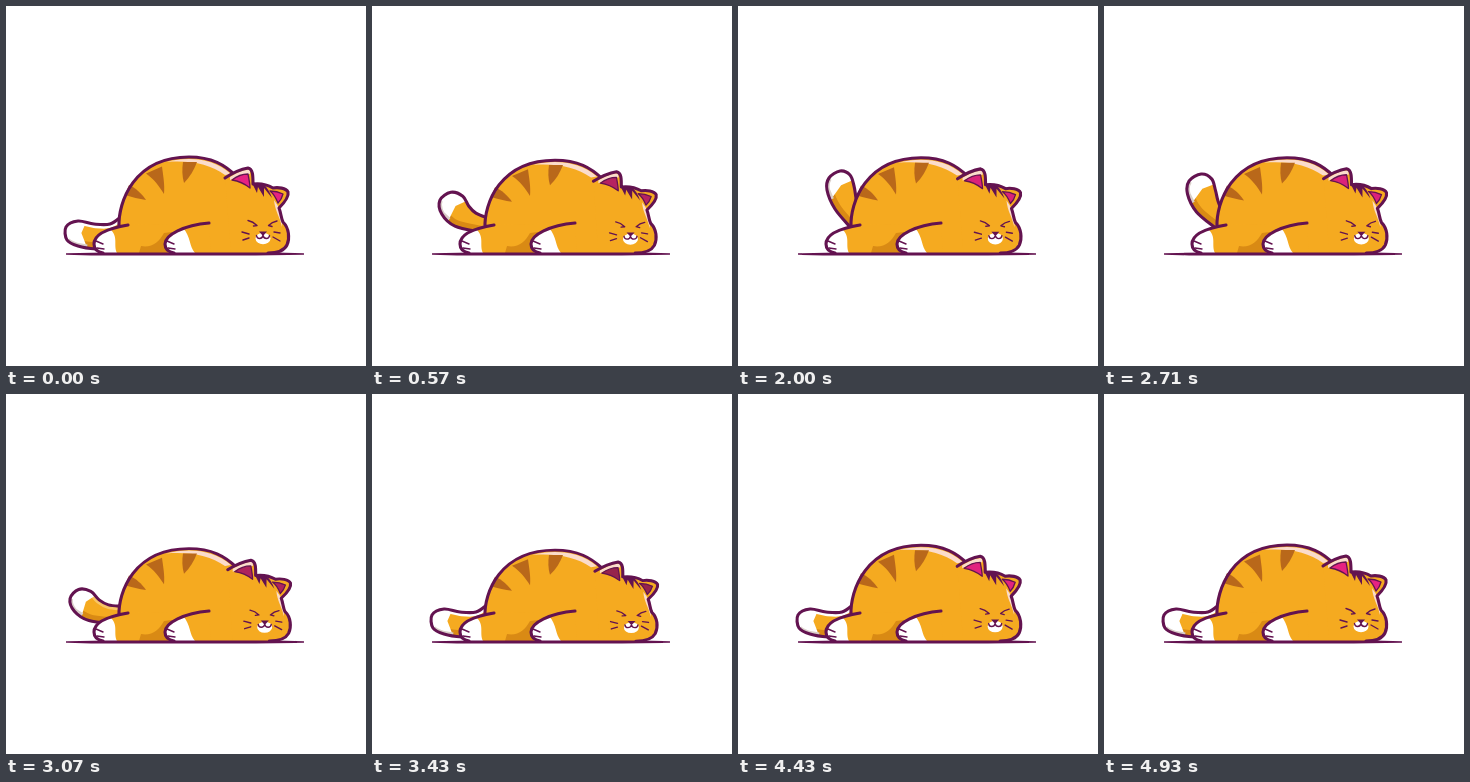
These frames come from a looping animation (360 px wide and 360 px high, 5000 ms). An HTML page:

```html
<!DOCTYPE html>
<html lang="en">
<head>
<meta charset="utf-8">
<title>Sleepy cat</title>
<style>
  html, body { margin: 0; width: 100%; height: 100%; overflow: hidden; background: #fff; }
  svg { display: block; width: 100vw; height: 100vh; }
  .line { fill: none; stroke: #631350; stroke-width: 3.1; stroke-linecap: round; stroke-linejoin: round; }
  .thin { stroke-width: 1.4; }
  .fur { fill: #f5aa20; }
  .shade { fill: #d98a14; }
  .stripe { fill: #b9681a; }
  .white { fill: #fff; }
  .glow { fill: #fbdccb; }
  .ink { fill: #631350; }
</style>
</head>
<body>
<svg viewBox="0 0 360 360">
  <defs><clipPath id="tailClip"><path id="tailMask"/></clipPath></defs>

  <g id="tail">
    <g clip-path="url(#tailClip)">
      <path id="tailFur" class="fur"/>
      <path id="tailShade" fill="none" stroke="#d98a14" stroke-width="13"/>
      <path id="tailGlow" fill="none" stroke="#fff" stroke-width="8"/>
      <path id="tailTip" class="white"/>
      <path id="tipShade" fill="none" stroke="#d9cfc9" stroke-width="6"/>
    </g>
    <path id="tailLine" class="line"/>
  </g>

  <g id="body">
    <path class="fur" d="M112 222C112 196 128 151 183 151C206 151 219 159 230 170L262 200L270 247H108Z"/>
    <path class="glow" d="M160 156C182 150 208 152 225 168L219 169C204 158 184 154 160 156Z"/>
    <g class="stripe">
      <path d="M123 179C130 182 136 188 140 194C133 193 126 191 119 189Z"/>
      <path d="M140 167.500L156 160.500C157 169 159 179 158 188C153 180 148 173 140 167.500Z"/>
      <path d="M177 156H191C188 164 184 171 178 177C176 170 176 163 177 156Z"/>
    </g>
    <path class="line" d="M113 221C112 196 128 151 183 151C206 151 219 159 230 170"/>
  </g>

  <g id="legs">
    <path class="fur" d="M122 219C104 222 88 228 88 239C88 244 92 247 97 247H205V217Z"/>
    <path class="white" d="M104 223C93 226 88 232 88 239C88 244 92 247 97 247H111C107 239 113 231 104 223Z"/>
    <path class="shade" d="M133 247L135 240C146 242 153 236 158 227L166 226L162 247Z"/>
    <path class="fur" d="M203 217C178 219 159 229 159 239C159 244 163 247 168 247H205Z"/>
    <path class="white" d="M177 222C164 228 159 234 159 239C159 244 163 247 168 247H189C183 240 185 231 177 222Z"/>
    <path class="line" d="M122 219C104 222 88 228 88 238C88 243 92 246 97 247M203 217C178 219 159 229 159 238C159 243 163 246 168 247"/>
    <path class="line thin" d="M90 235L97 238M91 242L98 243M161 235L168 238M162 242L169 243"/>
  </g>

  <g id="head">
    <path class="fur" d="M219 172C228 166 236 163 242 162C247 163 247 170 247 178C255 177 262 179 267 182C272 181 280 182 282 186C283 190 278 197 273 202C275 207 275 212 277 216C283 222 284 232 281 239C278 245 272 247 262 247H225Z"/>
    <path class="glow" d="M268 194C269 205 274 211 276 221C277 214 273 207 272 200Z"/>
    <path class="glow" d="M224 171C232 166 239 163 244 164L244 168C237 168 231 171 224 174Z"/>
    <g id="ears" stroke="#631350" stroke-width="1.3" stroke-linejoin="round">
      <path d="M226 174C231 170 237 168 242 168C243 173 244 178 244 182C239 178 233 175 226 174Z"/>
      <path d="M264 185C269 185 273 186 277 188C276 192 274 195 272 197C270 192 268 188 264 185Z"/>
    </g>
    <path class="ink" d="M246 177L251 187L252 181L258 191L258 182L266 192C264 186 261 181 257 178Z"/>
    <path class="line" d="M219 172C228 166 236 163 242 162C247 163 247 170 247 178C255 177 262 179 267 182C272 181 280 182 282 186C283 190 278 197 273 202C275 207 275 212 277 216C283 222 284 232 281 239C278 245 272 247 262 247"/>
    <ellipse class="white" cx="257" cy="232.5" rx="7.5" ry="5.8"/>
    <path class="ink" d="M253 225.500H261L257 230Z"/>
    <path class="line thin" d="M250.500 229.500C251 233.500 256 233.500 257 229.500C258 233.500 263 233.500 263.500 229.500"/>
    <path class="line thin" d="M242 214.500Q247 215.500 251 219.500L247.500 220M271 215Q266 216 262.500 219.500L266 220.500"/>
    <path class="line thin" d="M236 226L243 228M237 234L243 232M268 226L274 227M267 231L274 235"/>
  </g>

  <path class="ink" d="M60 247.200L100 246.500H270L298 247.200V248.800L250 249.500H85L60 248.800Z"/>
</svg>

<script>
  const LOOP = 5000, FRAMES = 70, FLOOR = 248;
  const $ = id => document.getElementById(id);
  const draw = (id, d) => $(id).setAttribute('d', d);

  // Tail outline, upper root to lower root: lying, half raised, raised
  const lying = [[116,210],[104,218],[88,218],[72,215],[60,221],[61,234],[72,240],[90,243],[112,243]];
  const half = [[116,212],[104,207],[97,200],[91,190],[79,186],[68,194],[70,208],[83,220],[108,226]];
  const raised = [[120,205],[118,192],[116,180],[112,169],[102,165],[91,172],[89,184],[97,203],[113,222]];

  // Smooth step from 0 to 1 between two times
  const ease = (t, from, to) =>
    (1 - Math.cos(Math.PI * Math.min(1, Math.max(0, (t - from) / (to - from))))) / 2;
  const mid = (a, b) => [(a[0] + b[0]) / 2, (a[1] + b[1]) / 2];

  function tailPoints(p) {
    const a = 2 * (p - .5) * (p - 1), b = 4 * p * (1 - p), c = 2 * p * (p - .5);
    return lying.map((q, i) => q.map((v, k) => a * v + b * half[i][k] + c * raised[i][k]));
  }

  // Catmull-Rom spline through points i..j
  function spline(pts, i, j) {
    const at = n => pts[Math.max(0, Math.min(pts.length - 1, n))];
    let d = 'M' + at(i);
    for (; i < j; i++) {
      const [p, q, r, s] = [at(i - 1), at(i), at(i + 1), at(i + 2)];
      d += 'C' + [q[0] + (r[0] - p[0]) / 6, q[1] + (r[1] - p[1]) / 6,
                  r[0] - (s[0] - q[0]) / 6, r[1] - (s[1] - q[1]) / 6, r[0], r[1]];
    }
    return d;
  }

  function poseTail(p) {
    const pts = tailPoints(p), outline = spline(pts, 0, 8);
    for (const id of ['tailMask', 'tailFur', 'tailLine']) draw(id, outline);
    draw('tailShade', spline(pts, 5, 8));
    draw('tailGlow', spline(pts, 0, 3));
    $('tailGlow').style.opacity = Math.max(0, 1 - 2 * p);
    const top = mid(pts[2], pts[3]), low = mid(pts[6], pts[7]), mc = mid(top, low);
    const notch = mid(mc, mid(mc, pts[4]));
    draw('tailTip', spline(pts, 3, 6) + 'L' + low + 'L' + notch + 'L' + top + 'Z');
    draw('tipShade', spline(pts, 5, 6) + 'L' + low);
  }

  // s: 0 = breathed in, 1 = breathed out
  function poseBody(s) {
    const by = 1 - .053 * s, hy = 1 - .07 * s, skew = -.025 * s;
    $('body').setAttribute('transform', `matrix(1 0 0 ${by} 0 ${FLOOR * (1 - by)})`);
    $('head').setAttribute('transform',
      `matrix(1 0 ${skew} ${hy} ${2 * s - skew * FLOOR} ${FLOOR * (1 - hy)})`);
    $('ears').setAttribute('fill', `rgb(${230 - 80 * s},${34 + 2 * s},${130 - 54 * s})`);
  }

  function render(now) {
    const frame = Math.floor((now % LOOP + 5) * FRAMES / LOOP) % FRAMES;
    const t = frame * LOOP / FRAMES;
    poseBody(ease(t, 0, 1000) - ease(t, 1400, 2200) + ease(t, 2500, 3400) - ease(t, 3750, 4550));
    poseTail(ease(t, 0, 1150) - ease(t, 2530, 3430));
    requestAnimationFrame(render);
  }
  render(0);
</script>
</body>
</html>
```
